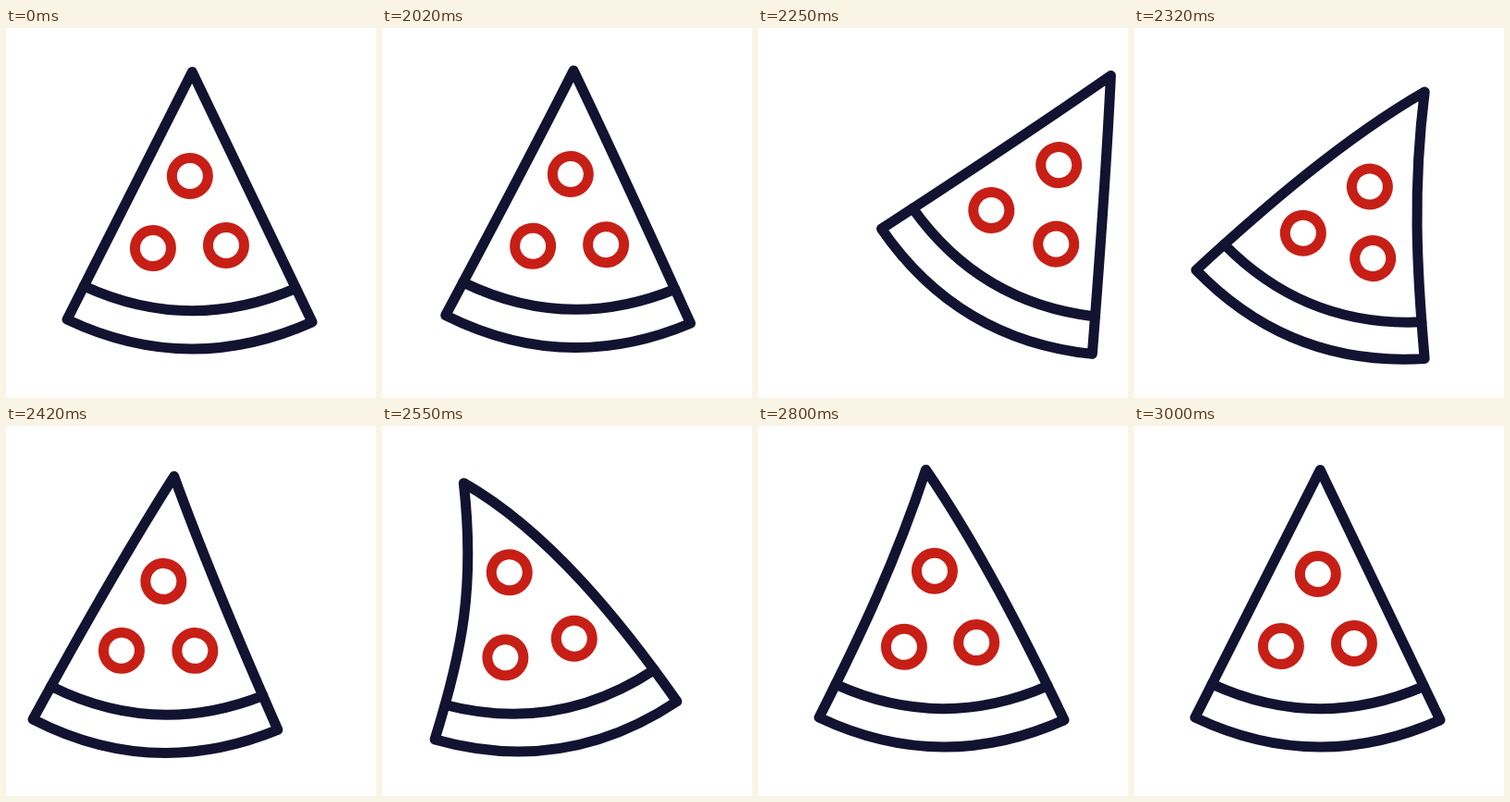
Recreate the animation shown at these times as an HTML page. Size 400 by 400 pixels, loop 3020 ms.

```html
<!DOCTYPE html>
<html lang="en">
<head>
<meta charset="utf-8">
<title>Pizza slice</title>
<style>
  html, body { margin: 0; width: 100%; height: 100%; overflow: hidden; background: #fff; }
  svg { display: block; width: 100%; height: 100%; }
  g { fill: none; stroke-width: 11; stroke-linecap: round; stroke-linejoin: round; }
  path { stroke: #121331; }
  circle { stroke: #c71f16; }
</style>
</head>
<body>
<svg viewBox="0 0 400 400">
  <g id="slice">
    <path id="outline"/>
    <path id="crust"/>
    <circle r="19.5"/><circle r="19.5"/><circle r="19.5"/>
  </g>
</svg>
<script>
const LOOP = 3020, BEGIN = 1995;
const HALF = 132.5, HEIGHT = 269, CRUST = 0.135;
const REST = { x: 198.5, y: 316.5, tilt: 0.6 };

// each topping: place above the base, and how far the bend carries it
const TOPPINGS = [
  { x: -1.3, h: 156.5, drift: 0.4, lift: 0.16 },
  { x: -40.4, h: 78, drift: 0.05, lift: -0.04 },
  { x: 38.6, h: 82, drift: 0.09, lift: 0.04 }
];

const slice = document.getElementById("slice");
const outline = document.getElementById("outline");
const crust = document.getElementById("crust");
const rings = slice.querySelectorAll("circle");

const smooth = u => (1 - Math.cos(Math.PI * u)) / 2;
const settle = u => 1 - (1 - u) ** 1.35;

// eases from one stop [time, value, ease] to the next
function track(time, value, ...stops) {
  let from = BEGIN;
  for (const [to, target, ease = smooth] of stops) {
    if (time <= from) break;
    value += (target - value) * ease(Math.min(1, (time - from) / (to - from)));
    from = to;
  }
  return value;
}

// control points of a side, from the base corner to the bent tip
const sidePoints = (side, bend) => [
  [side * HALF, 0],
  [side * HALF * 2 / 3, -HEIGHT / 3],
  [side * HALF / 3 + bend / 3, -HEIGHT * 2 / 3 + side * bend * 0.4],
  [bend, -HEIGHT]
];

function pointOn([a, b, c, d], u) {
  const v = 1 - u;
  return [0, 1].map(i =>
    v ** 3 * a[i] + 3 * v * v * u * b[i] + 3 * v * u * u * c[i] + u ** 3 * d[i]);
}

function draw(time) {
  // swing right, swing back past the middle, come to rest
  const x = track(time, REST.x, [2200, 265], [2390, 160], [2638, REST.x]);
  const y = track(time, REST.y, [2200, 277], [2390, 323], [2638, REST.y]);
  const tilt = track(time, REST.tilt, [2200, 33], [2540, -9], [2740, REST.tilt]);
  // the tip lags behind the base
  const bend = track(time, 0, [2150, -41], [2350, 32], [2560, -59], [2995, 0, settle]);

  slice.setAttribute("transform", `translate(${x} ${y}) rotate(${tilt})`);

  const left = sidePoints(-1, bend), right = sidePoints(1, bend);
  outline.setAttribute("d",
    `M${left[0]}C${left.slice(1)}C${right.slice(0, 3).reverse()} ${right[0]}`.replace(/C[^C]*$/,
      `C${right[2]} ${right[1]} ${right[0]}`) + `Q0 61 ${left[0]}Z`);

  const p = pointOn(left, CRUST), q = pointOn(right, CRUST);
  crust.setAttribute("d",
    `M${p}Q${(p[0] + q[0]) / 2} ${(p[1] + q[1]) / 2 + 51} ${q}`);

  TOPPINGS.forEach((topping, i) => {
    rings[i].setAttribute("cx", topping.x + bend * topping.drift);
    rings[i].setAttribute("cy", -topping.h + bend * topping.lift);
  });
}

const origin = performance.now();
function frame() {
  const time = (performance.now() - origin) % LOOP;
  draw(time < 2019 ? 0 : time);
  requestAnimationFrame(frame);
}
frame();
</script>
</body>
</html>
```
